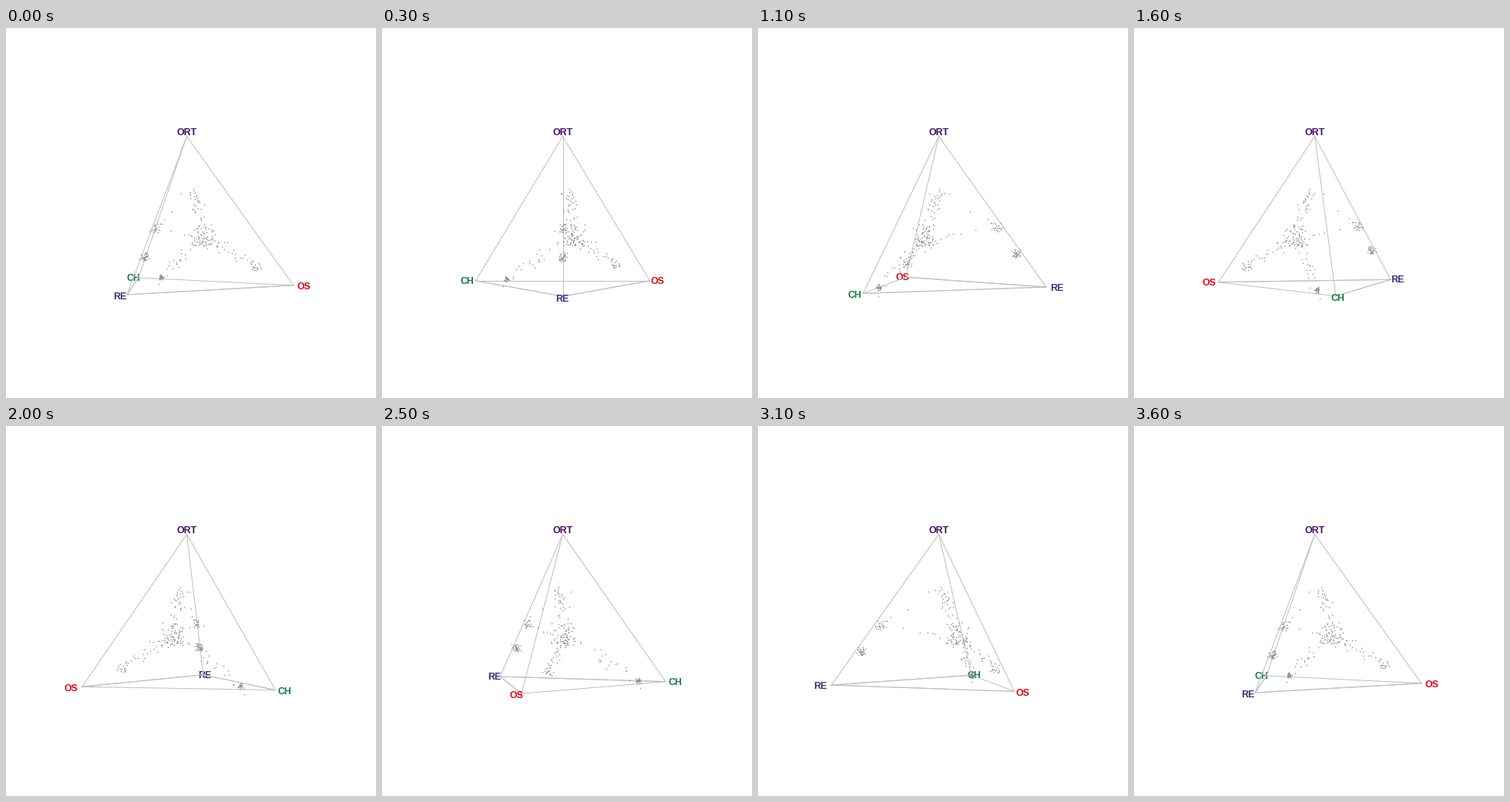
Animation, 480 px wide and 480 px high, one loop 3700 ms. Source, as a matplotlib script:

```python
import matplotlib.pyplot as plt
import numpy as np
from matplotlib.animation import FuncAnimation

SIZE, DPI = 480, 100
FRAMES, STEP_MS = 37, 100
PX = 72 / DPI
CX, BASE_Y = 234.5, 333.8
RADIUS, HEIGHT = 138.4, 193.3
TILT, PERSP = 28.2, 0.122

rng = np.random.default_rng(7)


def project(p, angle):
    """Turn (across, depth, height) points about the axis and project them."""
    u, v, t = np.asarray(p, float).T
    c, s = np.cos(angle), np.sin(angle)
    across, depth = u * c + v * s, v * c - u * s
    w = 1 - PERSP * depth
    x = CX + RADIUS * across / w
    y = (BASE_Y - TILT * depth - HEIGHT * t) / w
    return x, y, depth


def scatter(a, b, n, spread):
    """Random points around the segment a-b; a blob when a equals b."""
    a, b = np.array(a), np.array(b)
    noise = np.clip(rng.normal(size=(n, 3)), -2, 2)
    noise[:, 2] *= RADIUS / HEIGHT
    return a + (b - a) * rng.random((n, 1)) + spread * noise


def tetrahedron(apex, r):
    turns = np.radians([-150, -30, 90])
    base = np.column_stack([r * np.sin(turns), r * np.cos(turns), 0 * turns])
    return np.vstack([(0, 0, apex), base])


# Centres of the point cloud
TOP, CORE = (.05, 0, .66), (.18, -.07, .32)
CH, OS = (-.255, -.66, .02), (.645, -.1, .12)
RE_LOW, RE_HIGH = (-.37, .63, .222), (-.285, .485, .385)

POINTS = np.vstack([
    scatter(CH, CH, 26, .014),
    scatter(RE_LOW, RE_LOW, 34, .023),
    scatter(RE_HIGH, RE_HIGH, 15, .024),
    scatter(OS, OS, 18, .03),
    scatter(CORE, CORE, 50, .06),
    scatter(TOP, CORE, 42, .04),
    scatter(CORE, OS, 24, .03),
    scatter(CORE, CH, 28, .04),
    scatter(TOP, RE_HIGH, 10, .02),
    scatter(CORE, RE_HIGH, 6, .02),
])

COLORS = {"ORT": "#430c62", "CH": "#127a38", "RE": "#2f3180", "OS": "#e0040f"}
VERTS = tetrahedron(1, 1)
LABELS = tetrahedron(1.033, 1.1)
# The base edges meeting at RE are drawn twice, so they look heavier
EDGES = [(0, 1), (0, 2), (0, 3), (1, 3)] + 2 * [(1, 2), (2, 3)]

plt.rcParams["font.family"] = "Liberation Sans"
fig = plt.figure(figsize=(SIZE / DPI, SIZE / DPI), dpi=DPI, facecolor="white")
ax = fig.add_axes([0, 0, 1, 1])
ax.set(xlim=(0, SIZE), ylim=(SIZE, 0))
ax.axis("off")

lines = [ax.plot([], [], color="#bebebe", lw=PX, zorder=2)[0] for _ in EDGES]
dots, = ax.plot([], [], "s", color="#8c8c8c", ms=1.35 * PX, mew=0, zorder=3)
texts = [ax.text(0, 0, name, color=color, size=12.4 * PX, weight="bold",
                 ha="center", va="center_baseline")
         for name, color in COLORS.items()]


def update(i):
    angle = np.radians(10 * i)
    x, y, _ = project(VERTS, angle)
    for line, (a, b) in zip(lines, EDGES):
        line.set_data([x[a], x[b]], [y[a], y[b]])
    dots.set_data(*project(POINTS, angle)[:2])
    for text, lx, ly, depth in zip(texts, *project(LABELS, angle)):
        text.set_position((lx - .4, ly + .3))
        text.set_zorder(4 if depth >= 0 else 1)
    return [*lines, dots, *texts]


anim = FuncAnimation(fig, update, frames=FRAMES, interval=STEP_MS,
                     repeat=True, repeat_delay=0)
plt.show()
```
